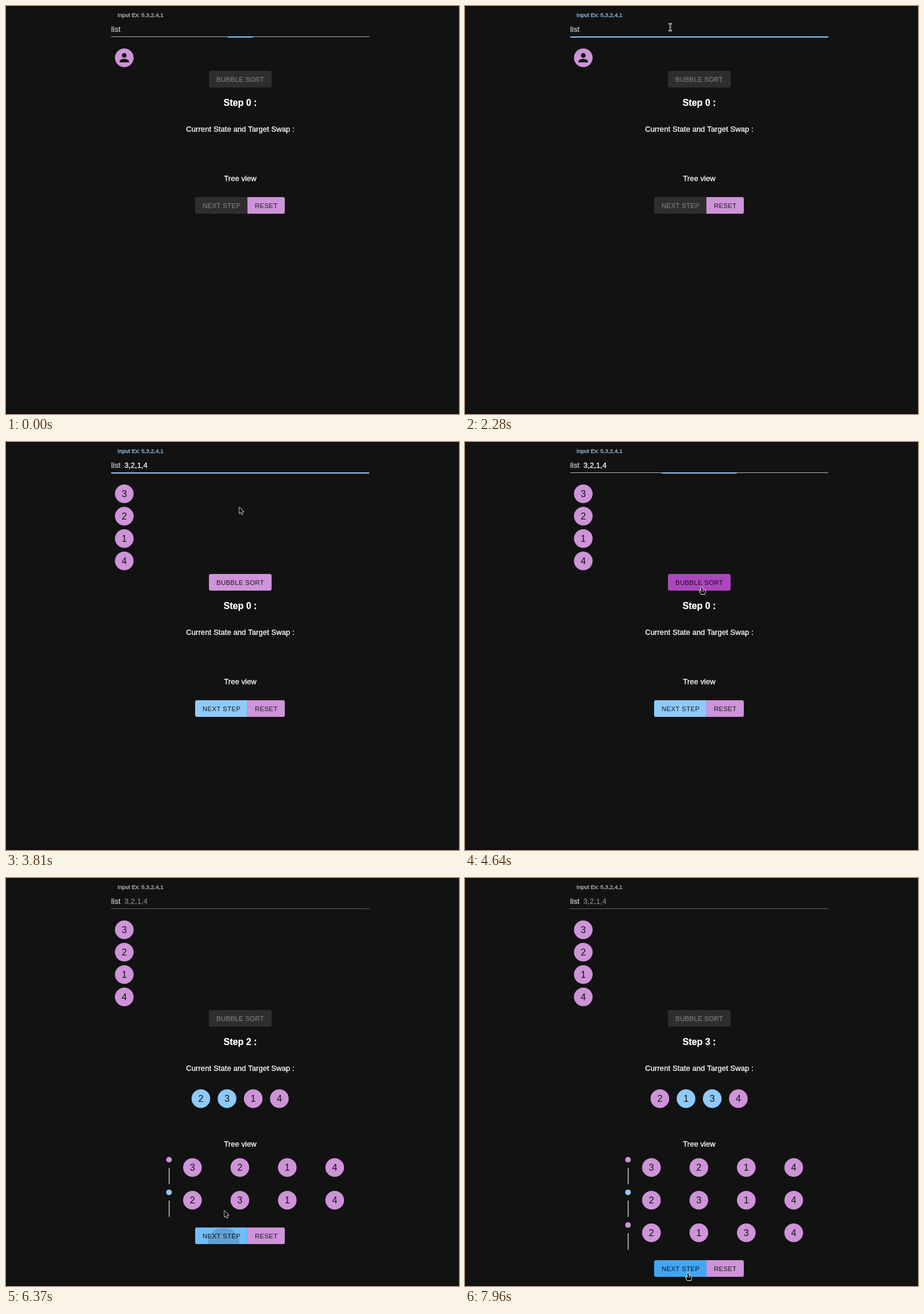
Recreate the animation shown at these times as an HTML page with a canvas. Size 788 by 711 pixels, loop 8000 ms.

```html
<!DOCTYPE html>
<html lang="en">
<head>
<meta charset="utf-8">
<title>Bubble sort steps</title>
<style>
  html, body { margin: 0; width: 100%; height: 100%; overflow: hidden; background: #121212; }
  canvas { display: block; }
</style>
</head>
<body>
<canvas id="stage" width="788" height="711"></canvas>
<script>
const ctx = document.getElementById('stage').getContext('2d');
const LOOP = 8000;
const FONT = 'Arial, "Liberation Sans", sans-serif';
const MID = 407.5;
const SOFT = 'rgba(255,255,255,0.7)';

const PURPLE = [206, 147, 216], DEEP_PURPLE = [171, 71, 188];
const BLUE = [144, 202, 249], DEEP_BLUE = [66, 165, 245];
const GREY = [46, 46, 46];

// Moments of the interaction
const SHOW = 60, FOCUS = 1735, WAKE = 3050, TYPE = 3090, BLUR = 4570, START = 4670;
const SWAPS = [6270, 6930];
const BLINK = 530;

const rows = ['3214', '2314', '2134'];

const cursorPath = [
  [60, 436, 675], [250, 414, 470], [450, 384, 200], [650, 363, 66], [810, 357, 36],
  [880, 357, 36], [1000, 361, 34], [1100, 361, 36], [1390, 361, 36], [1510, 357, 37],
  [3620, 357, 37], [3810, 405, 112], [3900, 413, 230], [3980, 412, 252],
  [5090, 412, 252], [5310, 402, 500], [5360, 394, 556], [5450, 385, 580],
  [5840, 385, 580], [6000, 379, 579], [6660, 379, 579], [6800, 383, 634],
  [7500, 383, 634], [7700, 387, 680], [7960, 388, 688]
];

// Background changes per button: [start, colour]
const bubbleFades = [[0, GREY], [WAKE, PURPLE], [3900, DEEP_PURPLE], [START, GREY]];
const nextFades = [[0, GREY], [WAKE, BLUE], [5355, DEEP_BLUE], [SWAPS[0], BLUE],
  [6715, DEEP_BLUE], [SWAPS[1], BLUE], [7640, DEEP_BLUE]];

const ripples = [
  { button: 'bubble', x: 412, dy: 22, down: BLUR, up: START, end: START },
  { button: 'next', x: 378.5, dy: 27.5, down: 6185, up: SWAPS[0], end: 6820 },
  { button: 'next', x: 383, dy: 25.5, down: 6845, up: SWAPS[1], end: 7480 }
];

const clamp = v => Math.max(0, Math.min(1, v));
const lerp = (a, b, k) => a + (b - a) * k;
const mix = (a, b, k) => a.map((v, i) => lerp(v, b[i], k));
const rgb = c => `rgb(${c.map(Math.round)})`;

function bezier(x1, y1, x2, y2) {
  const at = (a, b, s) => 3 * a * s * (1 - s) ** 2 + 3 * b * s * s * (1 - s) + s ** 3;
  return x => {
    if (x <= 0) return 0;
    if (x >= 1) return 1;
    let lo = 0, hi = 1;
    for (let i = 0; i < 20; i++) {
      const s = (lo + hi) / 2;
      if (at(x1, x2, s) < x) lo = s; else hi = s;
    }
    return at(y1, y2, lo);
  };
}
const easeInOut = bezier(0.4, 0, 0.2, 1);
const easeOut = bezier(0, 0, 0.2, 1);

function fade(list, t) {
  let value = list[0][1];
  for (let i = 1; i < list.length && list[i][0] <= t; i++) {
    const until = i + 1 < list.length ? Math.min(t, list[i + 1][0]) : t;
    value = mix(value, list[i][1], easeInOut((until - list[i][0]) / 250));
  }
  return value;
}

function cursorAt(t) {
  for (let i = 1; i < cursorPath.length; i++) {
    const [t0, x0, y0] = cursorPath[i - 1], [t1, x1, y1] = cursorPath[i];
    if (t <= t1) {
      const k = clamp((t - t0) / (t1 - t0));
      return { x: lerp(x0, x1, k), y: lerp(y0, y1, k) };
    }
  }
  const [, x, y] = cursorPath[cursorPath.length - 1];
  return { x, y };
}

// `weight` thickens light text a little, as light-on-dark screen text looks
function text(str, x, y, size, color, { align = 'left', bold = false, gap = 0.007, weight = 0.3 } = {}) {
  ctx.font = `${bold ? 'bold ' : ''}${size}px ${FONT}`;
  ctx.letterSpacing = `${gap * size}px`;
  ctx.textAlign = 'left';
  if (align === 'center') x -= ctx.measureText(str).width / 2;
  ctx.fillStyle = ctx.strokeStyle = color;
  ctx.fillText(str, x, y);
  if (weight) {
    ctx.lineWidth = weight;
    ctx.strokeText(str, x, y);
  }
}

function disc(x, y, r, color) {
  ctx.fillStyle = color;
  ctx.beginPath();
  ctx.arc(x, y, r, 0, Math.PI * 2);
  ctx.fill();
}

function avatar(x, y, label, color = PURPLE) {
  disc(x, y, 16.25, rgb(color));
  text(label, x, Math.round(y + 5.6), 16.25, '#121212', { align: 'center', weight: 0 });
}

const personShape = new Path2D('M12 12c2.21 0 4-1.79 4-4s-1.79-4-4-4-4 1.79-4 4 1.79 4 4 4z' +
  'm0 2c-2.67 0-8 1.34-8 4v2h16v-2c0-2.66-5.33-4-8-4z');

function emptyAvatar(x, y) {
  disc(x, y, 16.25, rgb(PURPLE));
  ctx.save();
  ctx.translate(x - 12.2, y - 12.2);
  ctx.scale(1.016, 1.016);
  ctx.fillStyle = '#121212';
  ctx.fill(personShape);
  ctx.restore();
}

function layout(t) {
  const step = t < START ? 0 : 1 + SWAPS.filter(s => t >= s).length;
  const shift = t < TYPE ? 0 : 117;
  const nextTop = step ? 495 + 57 * step : 333 + shift;
  return {
    step, shift,
    enabled: { bubble: t >= TYPE && t < START, next: t >= TYPE, reset: true },
    buttons: {
      bubble: { x: 353, y: 113 + shift, w: 109, h: 29, radii: 3.25 },
      next: { x: 329, y: nextTop, w: 91, h: 29, radii: [3.25, 0, 0, 3.25] },
      reset: { x: 420, y: nextTop, w: 65, h: 29, radii: [0, 3.25, 3.25, 0] }
    }
  };
}

const inside = (p, b) => p.x >= b.x && p.x <= b.x + b.w && p.y >= b.y && p.y <= b.y + b.h;

function drawButton(name, box, label, color, on, t) {
  ctx.save();
  ctx.beginPath();
  ctx.roundRect(box.x, box.y, box.w, box.h, box.radii);
  ctx.fillStyle = rgb(color);
  ctx.fill();
  ctx.clip();
  for (const r of ripples) {
    if (r.button !== name || t < r.down || t >= r.end) continue;
    const grow = easeInOut((t - r.down) / 550);
    const leave = 1 - easeInOut((t - r.up) / 550);
    disc(r.x, box.y + r.dy, 58 * grow, `rgba(0,0,0,${0.87 * lerp(0.1, 0.3, grow) * leave})`);
  }
  ctx.restore();
  const shade = Math.round(255 * (1 - on));
  text(label, box.x + 13, Math.round(box.y + 18.6), 11.375,
    `rgba(${shade},${shade},${shade},${lerp(0.3, 0.87, on)})`,
    { gap: 0.02857, weight: 0.3 * (1 - on) });
}

function drawField(t, hover) {
  const focused = t >= FOCUS && t < BLUR;
  const disabled = t >= START;
  const tint = focused ? clamp((t - FOCUS) / 180) : t >= BLUR ? 1 - clamp((t - BLUR) / 180) : 0;
  text('Input Ex: 5,3,2,4,1', 194, 18.5, 9.75, rgb(mix([188, 188, 190], BLUE, tint)), { gap: 0.004 });
  text('list', 183, 45, 13, SOFT);
  if (t >= TYPE) text('3,2,1,4', 206, 45, 13, disabled ? '#887a8c' : '#fff');

  if (disabled) {
    ctx.fillStyle = SOFT;
    for (let x = 183; x < 632; x += 2) ctx.fillRect(x, 53, 1, 1);
  } else if (hover) {
    ctx.fillStyle = '#fff';
    ctx.fillRect(183, 53, 449, 2);
  } else {
    ctx.fillStyle = SOFT;
    ctx.fillRect(183, 53, 449, 1);
  }

  let span = 0;
  if (t < SHOW) span = 0.098;
  else if (focused) span = easeOut((t - FOCUS) / 190);
  else if (t >= BLUR) span = 1 - easeOut((t - BLUR) / 200);
  if (span > 0) {
    ctx.fillStyle = rgb(BLUE);
    ctx.fillRect(MID - 224.5 * span, 53, 449 * span, 2);
  }

  const since = t >= TYPE ? t - TYPE : t - 1750;
  if (focused && since >= 0 && Math.floor(since / BLINK) % 2 === 0) {
    ctx.fillStyle = '#fff';
    ctx.fillRect(t >= TYPE ? 245 : 206, 34, 1, 14);
  }
}

function drawTree(step) {
  for (let r = 0; r < step; r++) {
    const y = 504.5 + 56.9 * r;
    disc(283.6, y - 13.6, 4.9, rgb(r % 2 ? BLUE : PURPLE));
    ctx.fillStyle = '#bdbdbd';
    ctx.fillRect(283, Math.round(y + 0.6), 1.6, 28.6);
    [...rows[r]].forEach((d, i) => avatar(324.3 + 82.5 * i, y, d));
  }
}

function outlined(path, lineWidth) {
  ctx.lineJoin = 'round';
  ctx.strokeStyle = '#fff';
  ctx.lineWidth = lineWidth;
  ctx.stroke(path);
  ctx.fillStyle = '#000';
  ctx.fill(path);
}

const arrow = new Path2D('M1 1V11.4L3.4 9.2L5.2 13.2L6.8 12.5L5.1 8.6H8.3Z');
const hand = new Path2D('M-1 1Q0 0 1 1V5L5 6Q6.2 6.5 6 8L5 13H-1L-4 8.4Q-4 7 -2.6 7.4L-1 9Z');
const beam = new Path2D('M-2.5 -6H-.5V6H-2.5V6.5H2.5V6H.5V-6H2.5V-6.5H-2.5Z');

function drawCursor(p, kind) {
  ctx.save();
  ctx.translate(Math.round(p.x), Math.round(p.y));
  if (kind === 'text') {
    outlined(beam, 1.5);
  } else if (kind === 'hand') {
    outlined(hand, 1.8);
    ctx.fillStyle = '#fff';
    for (const x of [1, 2.8]) ctx.fillRect(x, 6, 0.7, 3);
  } else {
    outlined(arrow, 1.5);
  }
  ctx.restore();
}

function draw(t) {
  const { step, shift, enabled, buttons } = layout(t);
  const cursor = cursorAt(t);
  const visible = t >= SHOW;
  const overField = visible && t < START && inside(cursor, { x: 183, y: 29, w: 449, h: 25 });
  const overButton = Object.keys(buttons).some(k => enabled[k] && inside(cursor, buttons[k]));

  ctx.fillStyle = '#121212';
  ctx.fillRect(0, 0, 788, 711);
  ctx.fillStyle = '#0e0e0e';
  ctx.fillRect(0, 0, 788, 2);
  ctx.fillRect(0, 708, 788, 3);

  drawField(t, overField);

  if (t < TYPE) emptyAvatar(205.75, 90.25);
  else [...rows[0]].forEach((d, i) => avatar(205.75, 90.25 + 39 * i, d));

  const wake = easeInOut((t - WAKE) / 250);
  const sleep = easeInOut((t - START) / 250);
  drawButton('bubble', buttons.bubble, 'BUBBLE SORT', fade(bubbleFades, t), wake - sleep, t);

  const centered = { align: 'center' };
  text(`Step ${step} :`, MID, 174 + shift, 16, '#fff', { align: 'center', bold: true, gap: 0 });
  text('Current State and Target Swap :', MID, 219 + shift, 13, '#fff', centered);
  text('Tree view', MID, 305 + shift + (step ? 46 : 0), 13, '#fff', centered);

  if (step) {
    [...rows[step - 1]].forEach((d, i) => {
      const swapped = step > 1 && (i === step - 2 || i === step - 1);
      avatar(339 + 45.5 * i, 384.4, d, swapped ? BLUE : PURPLE);
    });
    drawTree(step);
  }

  drawButton('next', buttons.next, 'NEXT STEP', fade(nextFades, t), wake, t);
  drawButton('reset', buttons.reset, 'RESET', PURPLE, 1, t);
  ctx.fillStyle = `rgba(66,165,245,${0.5 * wake})`;
  ctx.fillRect(419, buttons.next.y, 1, 29);

  if (visible) drawCursor(cursor, overField ? 'text' : overButton ? 'hand' : 'arrow');
}

const begin = performance.now();
function tick() {
  draw((performance.now() - begin) % LOOP);
  requestAnimationFrame(tick);
}
tick();
</script>
</body>
</html>
```
